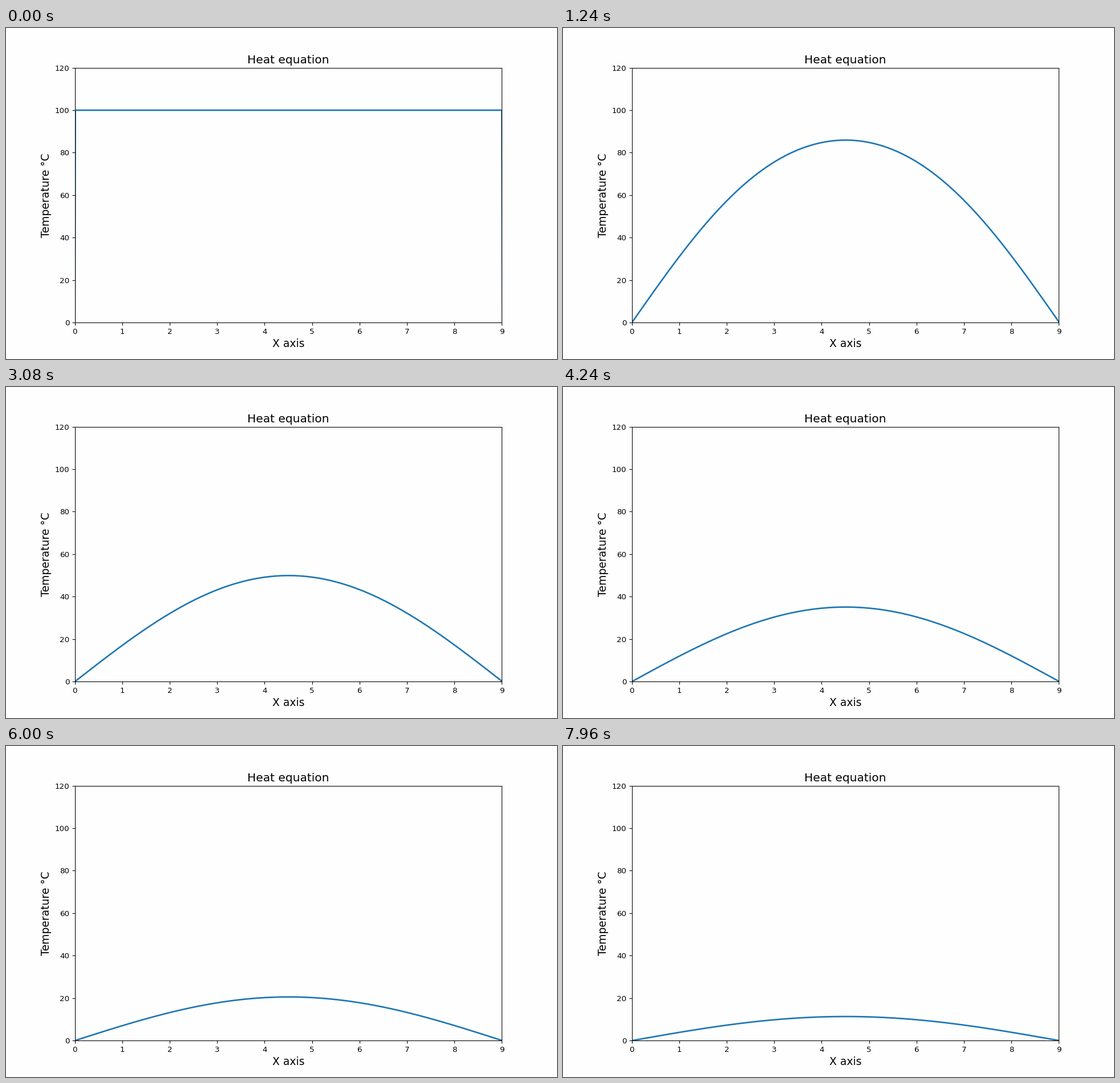
Write a matplotlib script that moves like this. It is 966 by 580 pixels and loops after 8000 ms.

```python
import numpy as np
import matplotlib.pyplot as plt
from matplotlib.animation import FuncAnimation

W, H, DPI = 966, 580, 96.6
FRAMES, INTERVAL = 200, 40
DX, X_MAX = 0.01, 9
LENGTH = X_MAX + DX  # the cold end lies one grid step past the axis
T0, DIFFUSIVITY = 100.0, 0.1

plt.rcParams["font.family"] = "DejaVu Sans"

x = np.linspace(0, LENGTH, round(LENGTH / DX) + 1)
waves = np.arange(1, 100, 2) * np.pi / LENGTH
shapes = np.sin(np.outer(x, waves))
weights = 4 * T0 / (waves * LENGTH)


def temperature(step):
    """Rod at T0 everywhere, both ends held at zero."""
    if step == 0:
        u = np.full_like(x, T0)
    else:
        u = shapes @ (weights * np.exp(-DIFFUSIVITY * step * waves**2))
    u[[0, -1]] = 0
    return u


fig, ax = plt.subplots(figsize=(W / DPI, H / DPI), dpi=DPI, facecolor="#fefefe")
fig.subplots_adjust(left=0.125, right=0.9, bottom=0.11, top=0.88)
ax.set_facecolor("#fefefe")
line, = ax.plot(x, temperature(0), color="#1f77b4", lw=2)
ax.set(xlim=(0, X_MAX), ylim=(0, 120))
ax.set_xticks(range(X_MAX + 1))
ax.set_yticks(range(0, 121, 20))
ax.set_title("Heat equation", fontsize=15)
ax.set_xlabel("X axis", fontsize=14)
ax.set_ylabel("Temperature °C", fontsize=14)


def update(step):
    line.set_ydata(temperature(step))
    return line,


anim = FuncAnimation(fig, update, frames=FRAMES, interval=INTERVAL,
                     repeat=True, repeat_delay=0)
plt.show()
```
